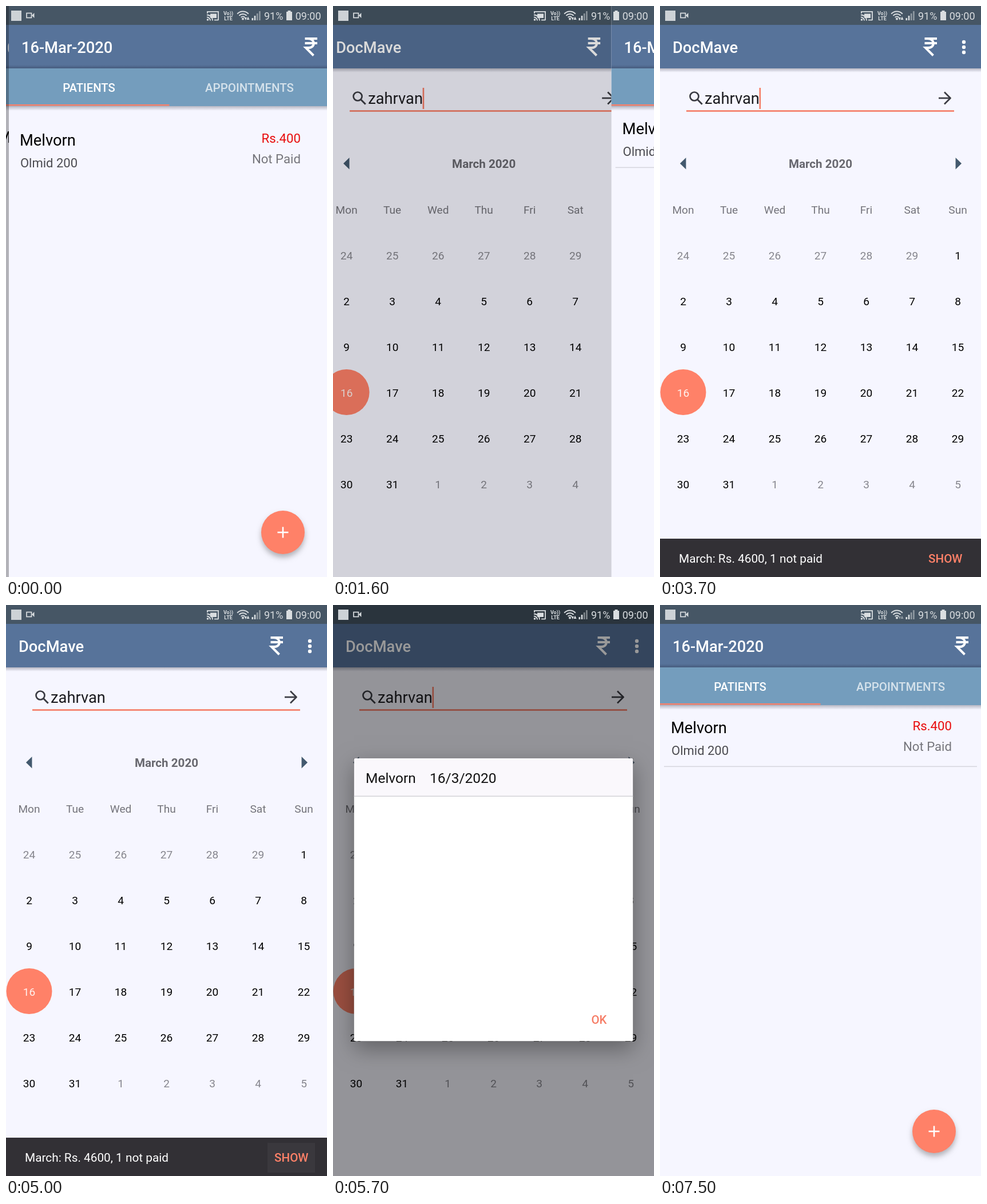
An HTML page with a canvas for the animation above (8000 ms loop, 561 by 998 pixels).

```html
<!DOCTYPE html>
<html lang="en">
<head>
<meta charset="utf-8">
<title>Clinic app</title>
<style>
html, body { margin: 0; width: 100%; height: 100%; overflow: hidden; }
canvas { display: block; }
</style>
</head>
<body>
<canvas id="stage" width="561" height="998"></canvas>
<script>
const W = 561, H = 998, LOOP = 8000, STEP = 100;
const ctx = document.getElementById('stage').getContext('2d');

const C = {
  status: '#465665', header: '#57739a', tabs: '#749dbd', page: '#f6f6ff',
  accent: '#ff8168', line: '#f67c65', dark: '#3b3c43', arrow: '#43596e',
  grey: '#74747b', faded: '#86868d', snack: '#323035', ink: '#d9dde0'
};
const APP = 'DocMave', QUERY = 'zahrvan', PATIENT = 'Melvorn', MEDICINE = 'Olmid 200';
const DAYS = ['Mon', 'Tue', 'Wed', 'Thu', 'Fri', 'Sat', 'Sun'];

// Moments at which each movement starts
const CLOSE = 1300, SNACK_IN = 3250, SNACK_OUT = 5300, DIALOG_IN = 5400, OPEN = 6900;

const progress = (t, start, duration) => Math.min(1, Math.max(0, (t - start) / duration));
const easeOut = p => 1 - (1 - p) ** 3;
const easeInOut = p => p < .5 ? 4 * p ** 3 : 1 - 4 * (1 - p) ** 3;
const smooth = p => p * p * (3 - 2 * p);
const pulse = p => Math.sin(Math.PI * p);

function rect(x, y, w, h, color) {
  ctx.fillStyle = color;
  ctx.fillRect(x, y, w, h);
}

function disc(x, y, r, color) {
  ctx.fillStyle = color;
  ctx.beginPath();
  ctx.arc(x, y, r, 0, 7);
  ctx.fill();
}

function arc(x, y, r, from, to, color, width) {
  ctx.strokeStyle = color;
  ctx.lineWidth = width;
  ctx.beginPath();
  ctx.arc(x, y, r, from * Math.PI, to * Math.PI);
  ctx.stroke();
}

function line(x1, y1, x2, y2, color, width) {
  ctx.strokeStyle = color;
  ctx.lineWidth = width;
  ctx.beginPath();
  ctx.moveTo(x1, y1);
  ctx.lineTo(x2, y2);
  ctx.stroke();
}

function scoped(draw) {
  ctx.save();
  draw();
  ctx.restore();
}

// Points right before it is turned; x, y is its middle
function triangle(x, y, length, breadth, turn, color) {
  scoped(() => {
    ctx.translate(x, y);
    ctx.rotate(turn * Math.PI);
    ctx.fillStyle = color;
    ctx.beginPath();
    ctx.moveTo(length / 2, 0);
    ctx.lineTo(-length / 2, -breadth / 2);
    ctx.lineTo(-length / 2, breadth / 2);
    ctx.fill();
  });
}

// cy is the middle of the capital letters
function text(str, x, cy, size, color, weight = 400, align = 'left') {
  ctx.font = `${weight} ${size}px Roboto, sans-serif`;
  ctx.textAlign = align;
  ctx.fillStyle = color;
  ctx.fillText(str, x, Math.round(cy + size * .355));
}

function fade(y, h, from, to) {
  const g = ctx.createLinearGradient(0, y, 0, y + h);
  g.addColorStop(0, `rgba(20,20,40,${from})`);
  g.addColorStop(1, `rgba(20,20,40,${to})`);
  rect(0, y, W, h, g);
}

function rupee(x, y) {
  line(x - 10.5, y - 14, x + 11, y - 14, '#fff', 4);
  line(x - 10.5, y - 6, x + 11, y - 6, '#fff', 4);
  ctx.beginPath();
  ctx.moveTo(x - 5, y - 14);
  ctx.bezierCurveTo(x + 8, y - 14, x + 8, y + 2, x - 4, y + 2);
  ctx.lineTo(x - 9, y + 2);
  ctx.lineTo(x + 4.5, y + 15.5);
  ctx.stroke();
}

function statusIcons(t) {
  const ink = C.ink, weak = 'rgba(217,221,224,.5)';
  rect(9, 8, 18, 18, '#cdd2d6');
  ctx.strokeStyle = ink;
  ctx.lineWidth = 1.7;
  ctx.strokeRect(36, 12.5, 8.5, 8);
  triangle(47.2, 16.5, 4.5, 9, 1, ink);

  line(351, 10, 372, 10, ink, 1.8);
  line(352, 10, 352, 13, ink, 1.8);
  line(371, 10, 371, 25, ink, 1.8);
  line(364, 24.5, 371, 24.5, ink, 1.8);
  rect(357, 13.5, 11, 7.5, ink);
  disc(352.5, 24, 1.8, ink);
  for (const r of [6, 10]) arc(351, 25.5, r, -.5, 0, ink, 1.8);

  text('Vo))', 388.5, 12.5, 9, ink, 700, 'center');
  text('LTE', 388.5, 21.5, 9, ink, 700, 'center');

  for (let r = 4.5; r < 14; r += 4.5) arc(414, 23, r, -.76, -.24, ink, 2);
  disc(414, 22.5, 2, ink);
  const arrows = t < 6400 ? ink : weak;
  triangle(418.8, 22.5, 5, 4.5, .5, arrows);
  triangle(423, 21.2, 5.5, 5, -.5, arrows);
  for (let i = 0; i < 4; i++) {
    const h = 4 + i * 4;
    rect(429.5 + i * 4.2, 25 - h, 2.6, h, i < 2 ? ink : weak);
  }
  text('91%', 451, 17.5, 18, ink);
  rect(490, 10, 10, 15, ink);
  rect(492.5, 8, 5, 2, ink);
  text('09:00', 550.5, 17.5, 18, ink, 400, 'right');
}

function bars() {
  rect(0, 0, W, H, C.page);
  rect(0, 0, W, 33, C.status);
  rect(0, 33, W, 76, C.header);
}

function calendar() {
  triangle(40.2, 275.3, 10.5, 20.5, 1, C.arrow);
  triangle(521.8, 275.3, 10.5, 20.5, 0, C.arrow);
  text('March 2020', 280.5, 276, 20.6, '#68686f', 700, 'center');
  disc(40.5, 675, 40, C.accent);
  DAYS.forEach((d, i) => text(d, 40.5 + i * 80, 356, 19.1, C.grey, 400, 'center'));
  for (let i = 0; i < 42; i++) {
    const inMonth = i >= 6 && i < 37;
    const day = i < 6 ? 24 + i : inMonth ? i - 5 : i - 36;
    const color = i === 21 ? '#fff3f0' : inMonth ? '#000' : C.faded;
    text(day, 40.5 + i % 7 * 80, 436 + Math.floor(i / 7) * 80, 19.1, color, 400, 'center');
  }
}

function searchField(t) {
  arc(60, 158, 7.5, 0, 2, C.dark, 2.7);
  line(65, 163, 73.7, 171.7, C.dark, 3);
  text(QUERY, 78, 161.5, 27.3, '#1c1c20');
  line(487, 161, 507, 161, C.dark, 2.7);
  for (const side of [-1, 1]) line(497, 161 + side * 10.5, 508, 161 - side * .5, C.dark, 2.7);
  rect(46, 182.2, 468, 2.6, C.line);
  // The cursor freezes when the dialog takes the focus
  const blinkOn = t < 2000 || t > 5500 || (t < 5000 && Math.floor(t / 500) % 2 === 1);
  if (blinkOn) rect(173.5, 143, 2.6, 37, C.line);
}

function snackbar(t) {
  const shown = easeOut(progress(t, SNACK_IN, 450)) - smooth(progress(t, SNACK_OUT, 310));
  if (shown <= 0) return;
  scoped(() => {
    ctx.translate(0, 67 * (1 - shown));
    rect(0, 931, W, 67, C.snack);
    rect(457, 940, 83, 52, `rgba(255,255,255,${.09 * pulse(progress(t, 4900, 700))})`);
    ctx.globalAlpha = progress(t, SNACK_IN, 450);
    text('March: Rs. 4600, 1 not paid', 33, 966, 20.8, '#fff');
    text('SHOW', 528.5, 966, 20.6, C.accent, 500, 'right');
  });
}

function homePage(t) {
  bars();
  fade(109, 7, .28, 0);
  text(APP, 22, 72, 27.3, '#fff', 500);
  const tap = progress(t, 2900, 700);
  disc(473, 71, 12 + 20 * tap, `rgba(255,255,255,${.2 * pulse(tap)})`);
  rupee(473, 71);
  for (const y of [63, 72, 81]) disc(531, y, 3.2, '#fff');
  searchField(t);
  calendar();
  snackbar(t);
}

function dialog(t) {
  const alpha = progress(t, DIALOG_IN, 250);
  if (!alpha) return;
  const x = 36.5, y = 268, w = 488, h = 494.5, top = 66;
  rect(-W, 0, W * 3, H, `rgba(0,0,0,${.6 * progress(t, DIALOG_IN + 100, 300)})`);
  ctx.globalAlpha = alpha;
  // Keep the shadow outside the translucent card
  scoped(() => {
    ctx.beginPath();
    ctx.rect(-W, 0, W * 3, H);
    ctx.rect(x, y, w, h);
    ctx.clip('evenodd');
    ctx.shadowColor = 'rgba(0,0,0,.34)';
    ctx.shadowBlur = 36;
    ctx.shadowOffsetY = 13;
    rect(x, y, w, h, '#000');
  });
  ctx.beginPath();
  ctx.roundRect(x, y, w, h, 3);
  ctx.clip();
  rect(x, y + top, w, h - top, '#fff');
  rect(x, y, w, top, '#faf8fc');
  const tap = progress(t, 6300, 500);
  scoped(() => {
    ctx.beginPath();
    ctx.rect(x, y, w, top);
    ctx.clip();
    disc(240, 302, 320 * tap, `rgba(0,0,0,${.1 * pulse(tap)})`);
  });
  rect(x, y + top - .5, w, 1.5, '#d4d3d8');
  text(PATIENT, 57, 302, 24.5, '#111');
  text('16/3/2020', 169, 302, 24.5, '#111');
  text('OK', 465, 725, 20.4, C.line, 500, 'center');
}

function listBase() {
  bars();
  fade(103, 6, 0, .25);
  rect(0, 109, W, 66, C.tabs);
  fade(175, 8, .28, 0);
  rect(0, 172, 280.5, 2.4, C.accent);
}

function listRow(dy) {
  text(PATIENT, 19, 214 + dy, 27.3, '#000');
  text(MEDICINE, 20, 254 + dy, 22, '#4b4b50');
  text('Rs.400', 510, 211 + dy, 22.2, '#e80c0c', 400, 'right');
  text('Not Paid', 510, 247 + dy, 22.2, '#76767c', 400, 'right');
}

// age: time since this page began to open
function listPage(age) {
  listBase();
  text('16-Mar-2020', 22, 72, 27.3, '#fff', 500);
  rupee(528, 71);
  text('PATIENTS', 140, 143, 20.3, '#fff', 500, 'center');
  text('APPOINTMENTS', 420.5, 143, 20.5, 'rgba(255,255,255,.7)', 500, 'center');
  const settled = age >= 600;
  if (age >= 300) listRow(settled ? 0 : 20);
  if (settled) rect(7, 281.5, 547, 1.6, '#d7d7df');
  scoped(() => {
    ctx.shadowColor = 'rgba(0,0,0,.28)';
    ctx.shadowBlur = 10;
    ctx.shadowOffsetY = 6;
    disc(479, 920, 38, C.accent);
  });
  line(469.5, 920, 488.5, 920, '#fff', 2.6);
  line(479, 910.5, 479, 929.5, '#fff', 2.6);
}

function previousList() {
  listBase();
  text('0', 2, 73, 27.3, '#fff', 500);
  text('M', -15, 229.5, 27.3, '#000');
}

function render(t) {
  // The loop begins near the end of an opening
  const closing = t >= CLOSE && t < OPEN;
  const age = t < OPEN ? t + 400 : t - OPEN;
  const cover = closing ? 1 - easeInOut(progress(t, CLOSE, 442)) : easeInOut(progress(age, 0, 460));
  const veil = .28 * (closing ? cover ** .32 : cover);

  if (t < CLOSE) {
    previousList();
  } else {
    rect(0, 0, W, H, C.page);
    scoped(() => {
      ctx.translate(-127 * (closing ? cover : cover ** 2), 0);
      homePage(t);
      dialog(t);
    });
  }
  rect(0, 0, W, H, `rgba(0,0,0,${veil})`);
  if (cover > 0) {
    scoped(() => {
      ctx.translate(W * (1 - cover), 0);
      listPage(age);
    });
  }
  statusIcons(t);
}

function tick(now) {
  render(Math.floor(now % LOOP / STEP) * STEP);
  requestAnimationFrame(tick);
}
requestAnimationFrame(tick);
</script>
</body>
</html>
```
